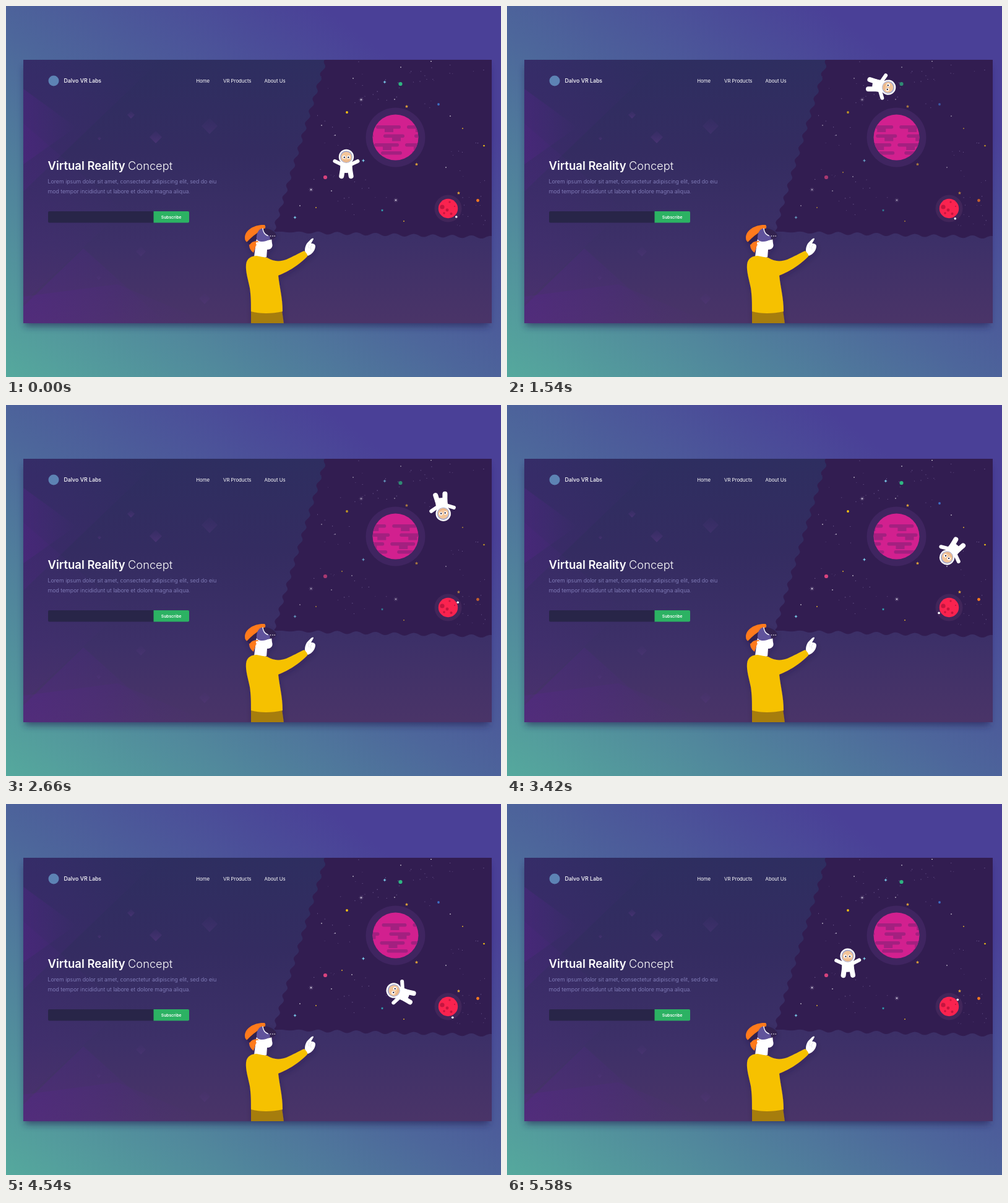
Write an HTML page that moves like this. It is 800 px wide and 600 px high and loops after 5.6 s.

```html
<!DOCTYPE html>
<html lang="en">
<head>
<meta charset="utf-8">
<title>Virtual Reality Concept</title>
<style>
html, body { margin: 0; width: 100%; height: 100%; overflow: hidden; }
body { background: linear-gradient(to top right, #55a99d 0%, #4d669b 47%, #4a4097 82%); }
svg { display: block; width: 800px; height: 600px; font-family: Inter, sans-serif; fill: #fff; }
.nav { font-size: 7.8px; }
.copy { font-size: 8.9px; font-weight: 300; fill: #918ecb; }
</style>
</head>
<body>
<svg viewBox="0 0 800 600">
  <defs>
    <linearGradient id="card" x2="0" y2="1">
      <stop stop-color="#2e2e60"/><stop offset=".35" stop-color="#342c61"/>
      <stop offset=".7" stop-color="#3d3068"/><stop offset="1" stop-color="#4a3468"/>
    </linearGradient>
    <linearGradient id="side">
      <stop stop-color="#5a2490" stop-opacity=".5"/><stop offset="1" stop-color="#5a2490" stop-opacity="0"/>
    </linearGradient>
    <linearGradient id="gem" x2="0" y2="1">
      <stop stop-color="#51327d" stop-opacity=".15"/><stop offset="1" stop-color="#5a3a82" stop-opacity=".65"/>
    </linearGradient>
    <filter id="blur" x="-10%" y="-10%" width="120%" height="120%"><feGaussianBlur stdDeviation="6"/></filter>
    <filter id="soft"><feDropShadow dx="1" dy="4" stdDeviation="5" flood-color="#1d1140" flood-opacity=".25"/></filter>
    <clipPath id="frame"><path d="M28 87H785V513H28Z"/></clipPath>
    <clipPath id="spaceClip"><path class="space"/></clipPath>
    <clipPath id="globe"><circle cx="629.5" cy="212.5" r="37"/></clipPath>
  </defs>

  <rect x="30" y="98" width="750" height="420" fill="#231c50" opacity=".6" filter="url(#blur)"/>
  <rect x="28" y="87" width="757" height="426" fill="url(#card)"/>

  <g clip-path="url(#frame)">
    <g fill="url(#side)">
      <path d="M28 87H250L28 300Z" opacity=".35"/>
      <path d="M28 134L113 196L28 256Z" opacity=".6"/>
      <path d="M28 190L190 330L28 480Z" opacity=".25"/>
      <path d="M28 486L125 392L260 513H28Z" opacity=".6"/>
      <path d="M28 470L180 450L330 513H28Z" opacity=".5"/>
    </g>
    <g id="gems" fill="url(#gem)"></g>

    <path class="space" fill="#321d51"/>
    <g id="dust" clip-path="url(#spaceClip)" fill="#78649a"></g>
    <g id="stars"></g>

    <circle cx="629.5" cy="212.5" r="48" fill="#3f2560"/>
    <circle cx="629.5" cy="212.5" r="37" fill="#d2208f"/>
    <g clip-path="url(#globe)"><g id="bands" fill="#a32080"></g></g>

    <circle cx="714.5" cy="327.5" r="22" fill="#41265a"/>
    <circle cx="714.5" cy="327.5" r="15.7" fill="#fa234f"/>
    <g fill="#c4153f">
      <circle cx="705" cy="325" r="3.6"/><circle cx="713" cy="330" r="2.4"/>
      <circle cx="717" cy="317" r="1.6"/><circle cx="719.5" cy="336" r="2"/>
      <circle cx="708" cy="335" r="1.7"/><circle cx="725" cy="324" r="1.1"/>
    </g>
    <circle id="moon" r="1.8"/>

    <g id="astronaut" stroke-linecap="round">
      <g fill="none" stroke="#fff">
        <path d="M544 257L531.5 251M556 257L568.5 251" stroke-width="6"/>
        <path d="M544 265L542.3 275.300M556 265L557.700 275.300" stroke-width="8"/>
      </g>
      <path d="M540.5 252Q550 246 559.5 252L560 268.500Q550 271.500 540 268.500Z"/>
      <circle cx="550" cy="244" r="12.2"/>
      <circle cx="550" cy="244" r="10" fill="#a5a9cc"/>
      <circle cx="550" cy="244.500" r="8.600" fill="#f3c599"/>
      <path d="M545 249.500Q550 252.500 555 249.500" fill="none" stroke="#e0a678"/>
      <circle cx="546.4" cy="244.500" r="2.7"/><circle cx="553.6" cy="244.500" r="2.7"/>
      <g fill="#26203c"><circle cx="546.8" cy="244.800" r="1.2"/><circle cx="553.4" cy="244.800" r="1.2"/></g>
    </g>

    <g filter="url(#soft)">
      <path fill="#a67d0d" d="M396 492Q421 500 446 492L449 514H396Z"/>
      <path d="M404 382L401 406Q411 411 421 406L422 394C428 394 432 390 430 384L429 376L405 376Z"/>
      <path d="M483 396C483 390 485 385 488 382L493 377Q497 374 497 377L493 384Q500 384 500 389C499 396 495 401 488 404Q484 402 483 396Z"/>
      <path d="M490 385Q488 389 490 392M494 386Q491 390 493 394" fill="none" stroke="#d9d4e6" stroke-width=".7"/>
      <path fill="#f6c102" d="M388 418C389 407 398 404 405 404Q414 406 422 407C431 413 442 414 453 410C463 406 474 399 482 396C485 399 488 402 487 405C477 415 465 424 453 430C447 433 442 435 440 436C442 455 447 472 447 494C430 498 410 498 396 494C396 480 396 470 394 456C391 441 387 430 388 418Z"/>
      <path fill="#ff7a1a" d="M386 375C386 362 402 353 418 354Q421 357 417 362C408 367 399 374 392 383Q386 381 386 375Z"/>
      <path fill="#ff7a1a" d="M393 386Q398 380 407 380Q410 385 404 387Q402 393 400 399Q393 394 393 386Z"/>
      <path fill="#30214f" d="M389 382Q400 370 414 362L414 376Q401 375 394 386Z"/>
      <circle cx="406" cy="384" r="2.2"/>
      <path fill="#30214f" d="M411 363C417 356 433 361 437 370Q437 376 427 378L414 380Z"/>
      <path fill="#61529c" d="M405 373C406 363 412 359 415 360Q417 368 426 372L427 377Q420 381 414 381C408 381 404 379 405 373Z"/>
      <g id="led">
        <path d="M415 360Q416 369 423 371.5" fill="none" stroke="#fff" stroke-width="1.4" stroke-linecap="round"/>
        <circle cx="427.5" cy="372" r=".8"/><circle cx="431" cy="372" r=".8"/><circle cx="434.2" cy="372" r=".8"/>
      </g>
    </g>
  </g>

  <circle cx="77" cy="121" r="8.5" fill="#5d83b4"/>
  <text x="93.5" y="124.3" font-size="8.8" font-weight="500">Dalvo VR Labs</text>
  <text class="nav" x="307.3" y="124.3">Home</text>
  <text class="nav" x="351" y="124.3">VR Products</text>
  <text class="nav" x="417.5" y="124.3">About Us</text>
  <text x="67.5" y="264.5" font-size="18.5" font-weight="600">Virtual Reality</text>
  <text x="197" y="264.5" font-size="18.3" font-weight="300">Concept</text>
  <text class="copy" x="67.5" y="287.2">Lorem ipsum dolor sit amet, consectetur adipiscing elit, sed do eiu</text>
  <text class="copy" x="67.5" y="303">mod tempor incididunt ut labore et dolore magna aliqua.</text>
  <rect x="68" y="332" width="172" height="18.5" rx="2" fill="#282548"/>
  <path d="M238.5 332H294q2 0 2 2V348.5q0 2-2 2H238.5Z" fill="#2cb263"/>
  <text x="267.2" y="343.8" font-size="6.7" font-weight="600" text-anchor="middle">Subscribe</text>
</svg>
<script>
const LOOP = 5600, TWINKLE = LOOP / 5, TAU = Math.PI * 2;
const $ = id => document.getElementById(id);

function add(parent, tag, attrs) {
  const el = document.createElementNS("http://www.w3.org/2000/svg", tag);
  for (const k in attrs) el.setAttribute(k, attrs[k]);
  return parent.appendChild(el);
}

let seed = 11;
const rand = () => (seed = seed * 16807 % 2147483647) / 2147483647;

// Scalloped outline of the projected view
const edge = [];
for (let y = 87; y <= 364; y += 2)
  edge.push([517 - (y - 87) * 0.305 + 2.6 * Math.sin((y - 94) / 20 * TAU), y]);
for (let x = 434; x <= 786; x += 3)
  edge.push([x, 365 + (x - 434) * 0.026 + 2.4 * Math.min(1, (x - 434) / 80) * Math.sin((x - 450) / 31 * TAU)]);
const outline = "M786 87L" + edge.map(p => p.map(n => n.toFixed(1)).join(" ")).join("L") + "Z";
document.querySelectorAll(".space").forEach(p => p.setAttribute("d", outline));

for (const [x, y, r] of [[202, 176, 6], [242, 212, 10], [329, 194, 13], [151, 214, 3], [218, 397, 8], [321, 473, 9], [150, 439, 4]])
  add($("gems"), "path", { d: `M${x - r} ${y}l${r} ${-r}l${r} ${r}l${-r} ${r}Z`, opacity: r > 12 || y > 350 ? 0.45 : 0.8 });

// Loose bands of dust: centre, spread
for (const [cx, cy, w, h] of [[715, 110, 62, 18], [540, 125, 40, 35], [525, 225, 40, 60], [580, 310, 55, 38], [740, 265, 40, 45], [650, 140, 60, 25], [740, 340, 35, 18]])
  for (let i = 0; i < 13; i++)
    add($("dust"), "circle", { cx: cx + (rand() * 2 - 1) * w, cy: cy + (rand() * 2 - 1) * h, r: 0.4 + rand() * 0.25 });

// Corners of a star with n points; inner radius as a share of r
function spike(x, y, r, n, inner) {
  const pts = Array.from({ length: n * 2 }, (_, i) => {
    const a = i * Math.PI / n - Math.PI / 2, d = i % 2 ? r * inner : r;
    return [x + d * Math.cos(a), y + d * Math.sin(a)];
  });
  return pts.join(" ");
}

const stars = $("stars");
const dot = (fill, r, ...at) => at.forEach(([cx, cy]) => add(stars, "circle", { cx, cy, r, fill }));
const star = (fill, r, n, inner, ...at) => at.forEach(([x, y]) => add(stars, "polygon", { points: spike(x, y, r, n, inner), fill }));
dot("#fff", 0.8, [687, 89.5], [561, 117], [638, 99], [718, 178], [510, 193], [532, 209], [628, 151], [711, 261], [559, 276], [526, 299], [475, 323]);
dot("#e9b92c", 0.9, [738, 198], [543, 269], [501, 326], [643, 348]);
dot("#2fb782", 3.1, [637.5, 126]);
dot("#f7c511", 1.9, [551, 172]);
dot("#f7c511", 1.3, [772.5, 226]);
dot("#3f6fc4", 1.9, [699, 159]);
dot("#d9437e", 3.1, [516, 277]);
dot("#ff7a1f", 2.4, [762.5, 314.5]);
star("#7fd4f3", 2.8, 4, 0.4, [612, 123], [577.5, 250], [467, 342]);
star("#e0a437", 2.8, 5, 0.45, [647.5, 162.5], [663.5, 256], [731.5, 302.5]);
star("#33a7b5", 2.2, 5, 0.5, [608, 330.5]);
star("#e6dff0", 4.2, 8, 0.16, [574, 151.5], [493, 297], [630, 314]);

// Cloud bands repeat every PITCH pixels
const PITCH = 50;
[[193, 0], [207.5, 12], [222, -3], [235, 8]].forEach(([y, shift], row) => {
  for (let i = -1; i < 4; i++) {
    const x = 598 + shift + (i - 1) * PITCH;
    add($("bands"), "rect", { x, y, width: row % 2 ? 34 : 40, height: 5.5, rx: 2.7 });
    if (row < 3) add($("bands"), "rect", { x: x + 14, y: y + 5, width: 14, height: 6 });
  }
});

function draw(t) {
  const p = t / LOOP, beat = t % TWINKLE / TWINKLE;
  $("astronaut").setAttribute("transform", `rotate(${p * 360} 631 216)`);
  $("bands").setAttribute("transform", `translate(${-p * PITCH})`);
  const a = (43 + t * 0.243) * TAU / 360;
  $("moon").setAttribute("cx", 714.5 + 18.2 * Math.cos(a));
  $("moon").setAttribute("cy", 328.5 + 18.2 * Math.sin(a));
  stars.setAttribute("opacity", 0.8 + 0.2 * Math.cos((beat - 0.05) * TAU));
  const blink = beat > 0.69 && beat < 0.98 ? Math.sin((beat - 0.69) / 0.29 * Math.PI) : 0;
  $("led").setAttribute("opacity", 1 - 0.4 * blink);
}

const start = performance.now();
function tick() {
  draw((performance.now() - start) % LOOP);
  requestAnimationFrame(tick);
}
tick();
</script>
</body>
</html>
```
